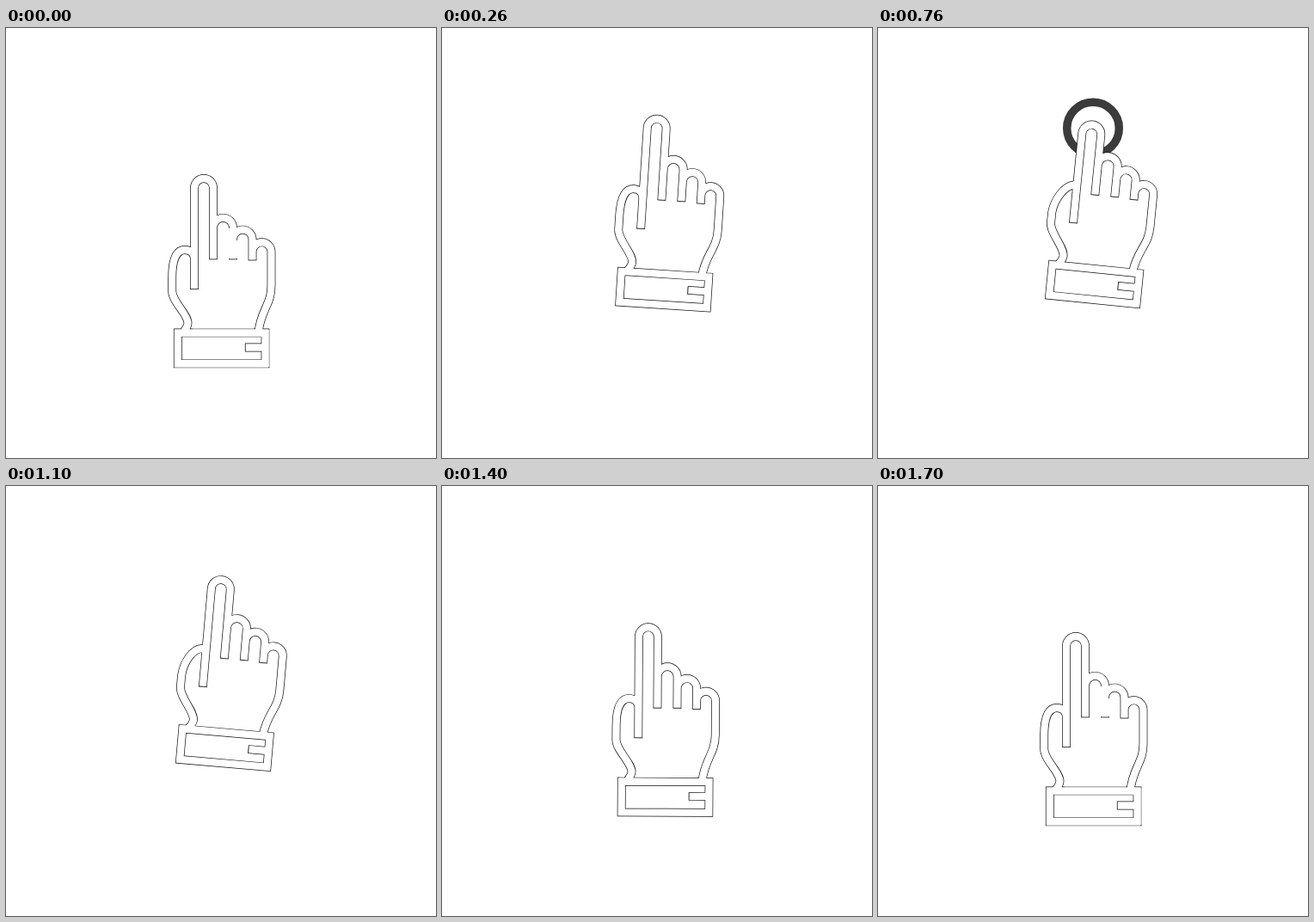
An HTML page that plays this animation: 500x500 px, repeating every 2.44 s.

```html
<!DOCTYPE html>
<html lang="en">
<head>
<meta charset="utf-8">
<title>Tapping hand</title>
<style>
  html, body { margin: 0; width: 100%; height: 100%; overflow: hidden; background: #fff; }
  svg { display: block; width: 100%; height: 100%; }
  path, circle { fill: none; }
  .body { fill: #fff; }
  .edge { stroke: #111; stroke-width: 9.8; }
  .line { stroke: #fff; stroke-width: 8.4; }
  .caps { stroke: #111; stroke-width: .8; }
  .wipe { stroke: #fff; stroke-width: 2.4; }
  .pale { stroke: #fff; stroke-width: 1.6; opacity: .5; }
</style>
</head>
<body>
<svg viewBox="0 0 500 500">
  <circle id="ring" cx="250" cy="116.5" stroke="#3b3b3b" stroke-width="9.5"/>
  <g id="hand">
    <path class="body shape"/>
    <path class="edge shape"/>
    <path class="line shape"/>
    <path class="caps" d="M214.2 303.6h9.6M236.2 268.9h9.6M259.2 268.9h9.6M281.7 270h9.6M278.3 367v9"/>
    <g id="rest">
      <path class="wipe" d="M259.5 233V268M268.5 247V268"/>
      <path class="pale" d="M217 350H288M205 359H297M196 394.6H305M305.8 351V394"/>
    </g>
  </g>
</svg>
<script>
const LOOP = 2440, STEP = 20, REST_AT = 1700;
const hand = document.getElementById('hand');
const ring = document.getElementById('ring');
const rest = document.getElementById('rest');
const shapes = document.querySelectorAll('.shape');

// time, cuff corner x, y, angle, finger press, thumb tuck
const POSES = [
  [0, 195, 395, 0, 0, 0],
  [130, 203, 363, 1.5, 0, 0],
  [260, 201.3, 323, 3.7, 0, 0],
  [400, 198.5, 318.5, 4.6, 0, .4],
  [540, 197, 319, 5, 1, .8],
  [650, 195.3, 317, 5.4, 7, 1],
  [760, 194, 315, 5.7, 13, 1],
  [880, 194, 315, 5.7, 13, 1],
  [1000, 195, 317, 5.4, 8, 1],
  [1100, 197, 322.2, 5, 3, .8],
  [1280, 205.3, 363.5, 1.4, 0, 0],
  [1400, 203.8, 384, .3, 0, 0],
  [1540, 198.2, 393.8, -.2, 0, 0],
  [1640, 195.5, 394.8, 0, 0, 0],
  [REST_AT, 195, 395, 0, 0, 0]
];

const mix = (a, b, p) => a + (b - a) * p;
const clamp = v => Math.max(0, Math.min(1, v));
const smooth = v => { v = clamp(v); return v * v * (3 - 2 * v); };

function slope(i, c) {
  if (i === 0 || i === POSES.length - 1) return 0;
  const a = POSES[i - 1], b = POSES[i + 1];
  return (b[c] - a[c]) / (b[0] - a[0]);
}

// Smooth cubic through the poses
function poseAt(t) {
  const last = POSES.length - 1;
  if (t >= REST_AT) return POSES[last].slice(1);
  let i = 0;
  while (POSES[i + 1][0] <= t) i++;
  const a = POSES[i], b = POSES[i + 1], d = b[0] - a[0];
  const u = (t - a[0]) / d, v = 1 - u;
  return [1, 2, 3, 4, 5].map(c =>
    v * v * (1 + 2 * u) * a[c] + u * u * (3 - 2 * u) * b[c] +
    d * u * v * (v * slope(i, c) - u * slope(i + 1, c)));
}

function outline(press, tuck) {
  const tip = 186 + press, drop = press * .15;
  const arch = (x, y, r, end) => `M${x} ${y + drop}a${r} ${r} 0 0 1 ${2 * r} 0V${end}`;
  const m = (a, b) => mix(a, b, tuck);
  return [
    `M219 304V${tip}a11 11 0 0 1 22 0V269`,
    arch(241, 232.3, 11.5, 269),
    arch(264, 245.8, 11.25, 270),
    arch(286.5, 260.2, 11, 300) + 'C308.5 322 296 328 293.5 354',
    `M219 269C219 262 ${m(214, 218)} 258 ${m(208, 215)} ${m(258, 260)}` +
      `C${m(198, 205)} ${m(258, 262)} ${m(193.2, 194.5)} ${m(270, 278)} 193.2 ${m(290, 294)}` +
      'V306C193.2 318 211.5 333 211.5 343C211.5 347 209 350 206 354',
    'M199.8 354.5H301.5V390.3H199.8Z',
    'M278 371.5H301.5'
  ].join('');
}

function draw(t) {
  const [x, y, angle, press, tuck] = poseAt(t);
  hand.setAttribute('transform', `translate(${x - 195} ${y - 395}) rotate(${angle} 195 395)`);
  const d = outline(press, tuck);
  shapes.forEach(s => s.setAttribute('d', d));

  const size = smooth((t - 570) / 190) * (1 - smooth((t - 890) / 180));
  ring.setAttribute('r', 30.3 * size);
  ring.style.display = size > .02 ? '' : 'none';
  rest.style.display = t >= REST_AT || t < STEP ? '' : 'none';
}

const start = performance.now();
function tick() {
  const t = (performance.now() - start) % LOOP;
  draw(Math.floor(t / STEP) * STEP);
  requestAnimationFrame(tick);
}
draw(0);
requestAnimationFrame(tick);
</script>
</body>
</html>
```
